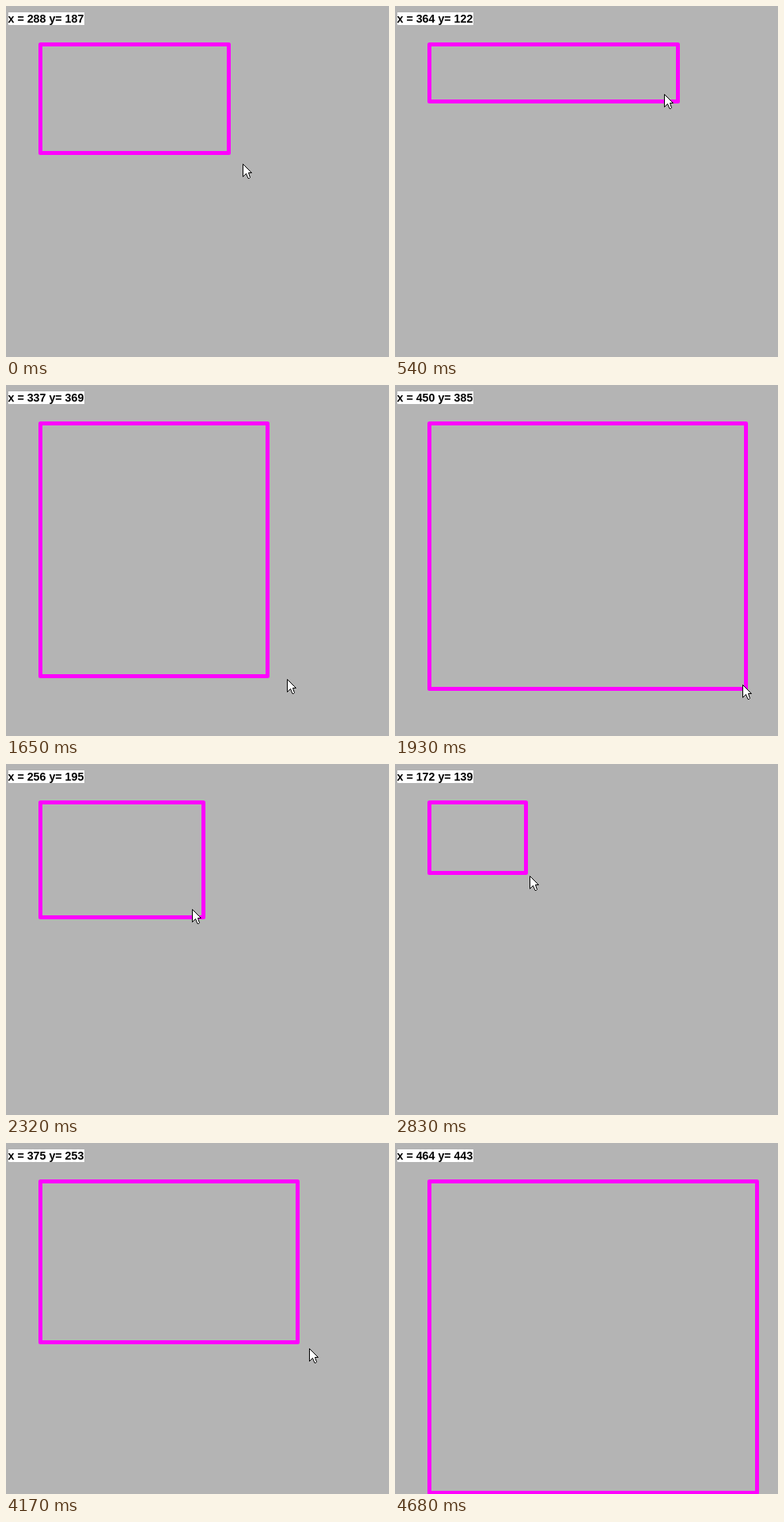
An HTML page with a canvas that plays this animation: 484 by 443 pixels, repeating every 4980 ms.

```html
<!DOCTYPE html>
<html>
<head>
<meta charset="utf-8">
<style>
  html, body { margin: 0; width: 100%; height: 100%; overflow: hidden; background: #b4b4b4; }
  canvas { display: block; }
</style>
</head>
<body>
<canvas id="stage" width="484" height="443"></canvas>
<script>
const ctx = document.getElementById('stage').getContext('2d');
const LOOP = 4980;
const LEAD = 40;    // the pointer runs this many ms ahead of the box
const SAMPLE = 135; // typical time between two redraws
const GRID = 30;    // redraws fall on this grid after each key point

// Key points of the mouse path: time, x, y
const path = [
  [0, 288, 187], [120, 338, 222], [390, 386, 160], [540, 364, 122],
  [690, 271, 97], [960, 102, 205], [1230, 78, 280], [1500, 245, 352],
  [1930, 450, 385], [2320, 256, 195], [2680, 163, 133], [3340, 232, 182],
  [4010, 232, 182], [4020, 286, 203], [4320, 418, 290], [4680, 464, 443]
];
const last = path.length - 1;

const segment = t => Math.min(last - 1, path.findLastIndex(key => key[0] <= t));

// Slope of one axis between two neighbouring key points
const secant = (i, axis) =>
  (path[i + 1][axis] - path[i][axis]) / (path[i + 1][0] - path[i][0]);

// Harmonic mean of both sides; flat at turning points, so nothing overshoots
function slope(i, axis) {
  if (i === 0) return secant(0, axis);
  if (i === last) return secant(last - 1, axis);
  const a = secant(i - 1, axis), b = secant(i, axis);
  return a * b > 0 ? 2 * a * b / (a + b) : 0;
}

function mouseAt(t) {
  const i = segment(t), from = path[i], to = path[i + 1];
  const span = to[0] - from[0];
  const u = Math.min(1, (t - from[0]) / span), v = 1 - u;
  return [1, 2].map(axis => Math.round(
    v * v * (1 + 2 * u) * from[axis] + u * u * (1 + 2 * v) * to[axis] +
    u * v * span * (v * slope(i, axis) - u * slope(i + 1, axis))));
}

// Time of the latest redraw: each segment is split into near-equal steps
function redrawTime(t) {
  if (t >= path[last][0]) return path[last][0];
  const i = segment(t), start = path[i][0], span = path[i + 1][0] - start;
  const count = Math.max(1, Math.round(span / SAMPLE));
  let time = start;
  for (let n = 1; n < count; n++) {
    const next = start + Math.ceil(span * n / count / GRID) * GRID;
    if (next <= t) time = next;
  }
  return time;
}

function drawLabel(x, y) {
  const text = `x = ${x} y= ${y}`;
  ctx.fillStyle = '#fff';
  ctx.fillRect(3, 8, 96 - 8 * (14 - text.length), 16);
  ctx.fillStyle = '#000';
  ctx.font = 'bold 14.25px "Liberation Sans", Arial, sans-serif';
  ctx.fillText(text, 2.5, 21);
}

function drawBox(x, y) {
  ctx.strokeStyle = '#f0f';
  ctx.lineWidth = 5;
  ctx.strokeRect(43.5, 48.5, x - 50, y - 50);
}

const arrow = new Path2D('M.5 .5V16.5L4.5 12.5L7 18.5H8.5L9.5 17.5L7.5 11.5H11.5Z');

function drawPointer(x, y) {
  ctx.save();
  ctx.translate(x - 7, y - 2);
  ctx.fillStyle = '#fff';
  ctx.strokeStyle = '#000';
  ctx.lineWidth = 1;
  ctx.fill(arrow);
  ctx.stroke(arrow);
  ctx.restore();
}

function draw(t) {
  const time = redrawTime(t);
  const mouse = mouseAt(time), pointer = mouseAt(time + LEAD);
  ctx.fillStyle = '#b4b4b4';
  ctx.fillRect(0, 0, 484, 443);
  ctx.lineJoin = 'round';
  drawBox(...mouse);
  drawLabel(...mouse);
  if (pointer[1] < 443) drawPointer(...pointer);
}

const start = performance.now();
function tick() {
  draw((performance.now() - start) % LOOP);
  requestAnimationFrame(tick);
}
tick();
</script>
</body>
</html>
```
